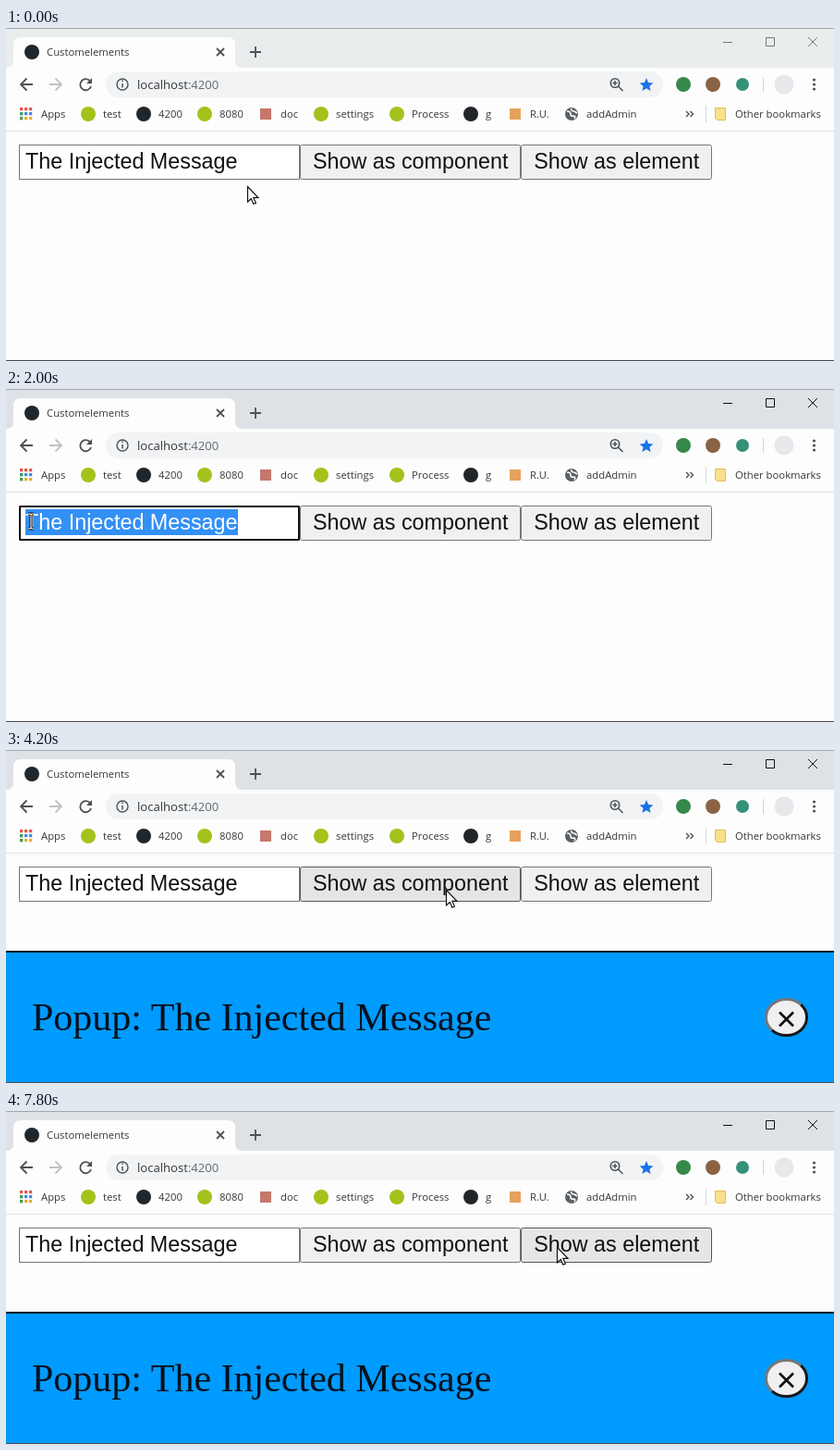
An HTML page for the animation above (8000 ms loop, 896x360 px).

```html
<!DOCTYPE html>
<html lang="en">
<head>
<meta charset="utf-8">
<title>Custom elements demo</title>
<style>
html, body { margin: 0; width: 100%; height: 100%; overflow: hidden; background: #fdfdfd; }
svg { display: block; width: 100vw; height: 100vh; }

.ui { font: 11.3px "Open Sans", sans-serif; fill: #35383c; }
.url { font-size: 13.1px; }
.form { font: 23.333px "Liberation Sans", Arial, sans-serif; fill: #111; }
.mid { text-anchor: middle; }
.popup-text { font: 42px "Liberation Serif", "Times New Roman", serif; fill: #07101c; }
.line { fill: none; stroke: #4d5156; stroke-width: 1.8; }
.box { stroke: #767676; }
.button { fill: #f0eff2; }

/* Everything changes in hard steps; 2.5% of the loop is 200 ms. */
.step { animation: 8s step-end infinite; }

.bar { fill: #dee1e6; animation-name: bar; }
@keyframes bar { 0% { fill: #e9eded; } 20% { fill: #dee1e6; } }
.controls { stroke: #111; fill: none; animation-name: controls; }
@keyframes controls { 0% { stroke: #777; } 20% { stroke: #111; } }

.input { fill: #fff; animation-name: input; }
@keyframes input { 0% { stroke: #767676; } 5% { stroke: #444; } 20% { stroke: #767676; } }
.focus { animation-name: focus; }
@keyframes focus { 0% { opacity: 0; } 20% { opacity: 1; } 50% { opacity: 0; } }
.selection { animation-name: selection; }
@keyframes selection {
  0% { clip-path: inset(0 0 0 230px); }
  22.5% { clip-path: inset(0 0 0 119px); }
  25% { clip-path: inset(0); }
  50% { clip-path: inset(0 0 0 230px); }
}

.hover-component { animation-name: hover-component; }
@keyframes hover-component {
  0% { fill: #f0eff2; stroke: #767676; }
  42.5% { fill: #e6e4e6; stroke: #555; }
  72.5% { fill: #f0eff2; stroke: #767676; }
}
.hover-element { animation-name: hover-element; }
@keyframes hover-element {
  0% { fill: #f0eff2; stroke: #767676; }
  95% { fill: #e7e5e8; stroke: #555; }
}
.hover-close { animation-name: hover-close; }
@keyframes hover-close { 0% { fill: #f0eff2; } 77.5% { fill: #e5e5e5; } 90% { fill: #f0eff2; } }

.scrollbar { animation-name: scrollbar; }
@keyframes scrollbar { 0% { opacity: 0; } 50% { opacity: 1; } 52.5% { opacity: 0; } }
.popup { animation-name: popup; }
@keyframes popup { 0% { opacity: 0; } 52.5% { opacity: 1; } }

.pointer { animation-name: pointer; }
@keyframes pointer {
  0% { transform: translate(261px, 171px); }
  2.5% { transform: translate(262px, 166px); }
  5% { transform: translate(262px, 158px); }
  7.5% { transform: translate(261px, 151px); }
  20% { transform: translate(251px, 150px); }
  22.5% { transform: translate(140px, 146px); }
  25% { transform: translate(27px, 143px); }
  27.5% { transform: translate(44px, 190px); }
  30% { transform: translate(130px, 232px); }
  32.5% { transform: translate(230px, 249px); }
  37.5% { transform: translate(300px, 228px); }
  40% { transform: translate(385px, 190px); }
  42.5% { transform: translate(450px, 159px); }
  45% { transform: translate(476px, 151px); }
  70% { transform: translate(519px, 149px); }
  72.5% { transform: translate(640px, 190px); }
  75% { transform: translate(770px, 255px); }
  77.5% { transform: translate(841px, 290px); }
  90% { transform: translate(790px, 262px); }
  92.5% { transform: translate(700px, 208px); }
  95% { transform: translate(622px, 160px); }
  97.5% { transform: translate(596px, 147px); }
}
.arrow { animation-name: arrow; }
@keyframes arrow { 0% { opacity: 1; } 5% { opacity: 0; } 27.5% { opacity: 1; } }
.beam { animation-name: beam; }
@keyframes beam { 0% { opacity: 0; } 5% { opacity: 1; } 27.5% { opacity: 0; } }
.trail { animation-name: trail; }
@keyframes trail { 0% { opacity: 0; } 70% { opacity: 1; } 72.5% { opacity: 0; } }
</style>
</head>
<body>
<svg viewBox="0 0 896 360">
  <defs>
    <path id="arrow" d="M.5.5V17L4.3 13.5 6.8 19.2 9.4 18.1 6.9 12.4H12Z" fill="#fff" stroke="#111" stroke-width="1.2"/>
    <path id="beam" d="M-3-8H-1L0-7 1-8H3M0-7V7M-3 8H-1L0 7 1 8H3" fill="none"/>
    <circle id="mark" r="8"/>
  </defs>
  <rect width="896" height="360" fill="#fdfdfd"/>

  <!-- Tab strip -->
  <rect class="step bar" width="896" height="43"/>
  <rect width="896" height="1" fill="#a5a8a8"/>
  <path d="M0 43Q8 43 8 35V18Q8 10 16 10H240Q248 10 248 18V35Q248 43 256 43Z" fill="#fdfdfd"/>
  <use href="#mark" x="28" y="26" fill="#20262a"/>
  <text class="ui" x="44" y="30">Customelements</text>
  <path class="line" d="M228 22l8 8m0-8l-8 8" stroke-width="1.5"/>
  <path class="line" d="M264 26h12m-6-6v12"/>
  <path class="step controls" d="M776 15.5h10M822.5 10.5h9v9h-9zM868 10l10 10m0-10l-10 10"/>

  <!-- Toolbar -->
  <rect x="108" y="47" width="603" height="28" rx="14" fill="#f1f3f4"/>
  <path class="line" d="M29 61H16m6.500-6.500L16 61l6.500 6.500"/>
  <path class="line" d="M47 61h13m-6.500-6.500L60 61l-6.500 6.500" style="stroke:#bfc2c5"/>
  <path class="line" d="M91 57.500A6 6 0 1 0 92 63"/>
  <path d="M93 54v6h-6z" fill="#4d5156"/>
  <circle class="line" cx="126" cy="61" r="6" style="stroke-width:1.4"/>
  <path class="line" d="M126 60v4.500m0-8v1.600" style="stroke-width:1.5"/>
  <text class="ui url" x="142" y="66">localhost<tspan fill="#666a6e">:4200</tspan></text>
  <circle class="line" cx="659" cy="59.500" r="4.700" style="stroke-width:1.6"/>
  <path class="line" d="M662.500 63l5 5M656.500 59.500h5m-2.500-2.500v5" style="stroke-width:1.5"/>
  <path d="M693 54l2.100 4.900 5.300.5-4 3.500 1.200 5.200-4.600-2.800-4.600 2.800 1.200-5.200-4-3.500 5.300-.5z" fill="#1a73e8"/>
  <use href="#mark" x="733" y="61" fill="#35894a"/>
  <use href="#mark" x="765" y="61" fill="#8a6244"/>
  <circle cx="797" cy="61" r="7" fill="#36917a"/>
  <path d="M819.500 53v16" stroke="#d0d3d6"/>
  <circle cx="842" cy="61" r="10.500" fill="#e8e8ec"/>
  <g fill="#4d5156">
    <circle cx="874.500" cy="56" r="1.600"/><circle cx="874.500" cy="61" r="1.600"/><circle cx="874.500" cy="66" r="1.600"/>
  </g>

  <!-- Bookmarks -->
  <g fill="none" stroke-width="3.200" stroke-dasharray="3.200 1.800">
    <path d="M15 87.600h13.500" stroke="#e0564a"/>
    <path d="M15 92.600h13.500" stroke="#4586e0"/>
    <path d="M15 97.600h13.500" stroke="#e9ae2c"/>
    <path d="M15 92.600v5" stroke="none"/>
  </g>
  <path d="M15 91h3.200v3.200H15zM15 96h3.200v3.200H15z" fill="#3c9f59"/>
  <g fill="#a3c21b">
    <use href="#mark" x="89" y="93"/><use href="#mark" x="215" y="93"/>
    <use href="#mark" x="341" y="93"/><use href="#mark" x="423" y="93"/>
  </g>
  <use href="#mark" x="149" y="93" fill="#20262a"/>
  <rect x="275" y="87" width="12" height="12" fill="#c5786b"/>
  <use href="#mark" x="503" y="93" fill="#22262b"/>
  <rect x="545" y="87" width="12" height="12" fill="#e5a15c"/>
  <circle cx="612" cy="93" r="7" fill="#5b6065"/>
  <path d="M607 90q4 0 4 3t3 2q3 0 1 3M612 87q-1 3 3 3l3 2" fill="none" stroke="#fdfdfd" stroke-width="1.600"/>
  <g class="ui">
    <text x="38" y="97">Apps</text>
    <text x="105" y="97">test</text>
    <text x="165" y="97">4200</text>
    <text x="231" y="97">8080</text>
    <text x="297" y="97">doc</text>
    <text x="357" y="97">settings</text>
    <text x="439" y="97">Process</text>
    <text x="519" y="97">g</text>
    <text x="567" y="97">R.U.</text>
    <text x="628" y="97">addAdmin</text>
    <text x="789" y="97">Other bookmarks</text>
  </g>
  <path class="line" d="M736 90l3 3-3 3m4.500-6l3 3-3 3" style="stroke-width:1.4"/>
  <path d="M757.500 84v18" stroke="#d5d8da"/>
  <path d="M767.500 86.500h11v13h-9l-2-2z" fill="#fbe08a" stroke="#e3bd55"/>
  <path d="M0 111.500h896" stroke="#dfe1e3"/>

  <!-- Page -->
  <rect class="box step input" x="14.500" y="126.500" width="303" height="37"/>
  <text class="form" x="21" y="152">The Injected Message</text>
  <g class="step selection">
    <rect x="21" y="130" width="230" height="28" fill="#3390f5"/>
    <text class="form" x="21" y="152" style="fill:#fff">The Injected Message</text>
  </g>
  <rect class="box button step hover-component" x="318.500" y="126.500" width="238" height="37" rx="2"/>
  <rect class="box button step hover-element" x="557.500" y="126.500" width="206" height="37" rx="2"/>
  <rect class="step focus" x="15" y="127" width="302" height="36" rx="1.500" fill="none" stroke="#101010" stroke-width="2"/>
  <text class="form mid" x="437.700" y="152">Show as component</text>
  <text class="form mid" x="660.700" y="152">Show as element</text>

  <g class="step scrollbar">
    <rect x="879" y="112" width="17" height="248" fill="#f1f1f1"/>
    <rect x="881" y="129" width="13" height="135" fill="#c1c1c1"/>
    <path d="M884 123l3.500-4 3.500 4z" fill="#a3a3a3"/>
    <path d="M884 348l3.500 4 3.500-4z" fill="#505050"/>
  </g>

  <g class="step popup">
    <rect y="217" width="896" height="143" fill="#009bff"/>
    <rect y="217" width="896" height="2" fill="#061018"/>
    <text class="popup-text" x="28" y="303">Popup: The Injected Message</text>
    <ellipse class="step hover-close" cx="844.500" cy="289" rx="22" ry="19.500"/>
    <g fill="none" stroke-width="3">
      <path d="M828.900 302.800A22 19.500 0 0 1 860.100 275.200" stroke="#777"/>
      <path d="M860.100 275.200A22 19.500 0 0 1 828.900 302.800" stroke="#17191c"/>
    </g>
    <path d="M837 283.500l15 15m0-15l-15 15" fill="none" stroke="#111" stroke-width="2.600"/>
  </g>
  <rect y="359" width="896" height="1" fill="#4c4c4c"/>

  <!-- Mouse pointer -->
  <g class="step trail">
    <use href="#arrow" x="501" y="149"/>
    <use href="#arrow" x="508" y="149"/>
  </g>
  <g class="step pointer">
    <use class="step arrow" href="#arrow"/>
    <g class="step beam">
      <use href="#beam" stroke="#111" stroke-width="3.200"/>
      <use href="#beam" stroke="#fff" stroke-width="1.100"/>
    </g>
  </g>
</svg>
</body>
</html>
```
